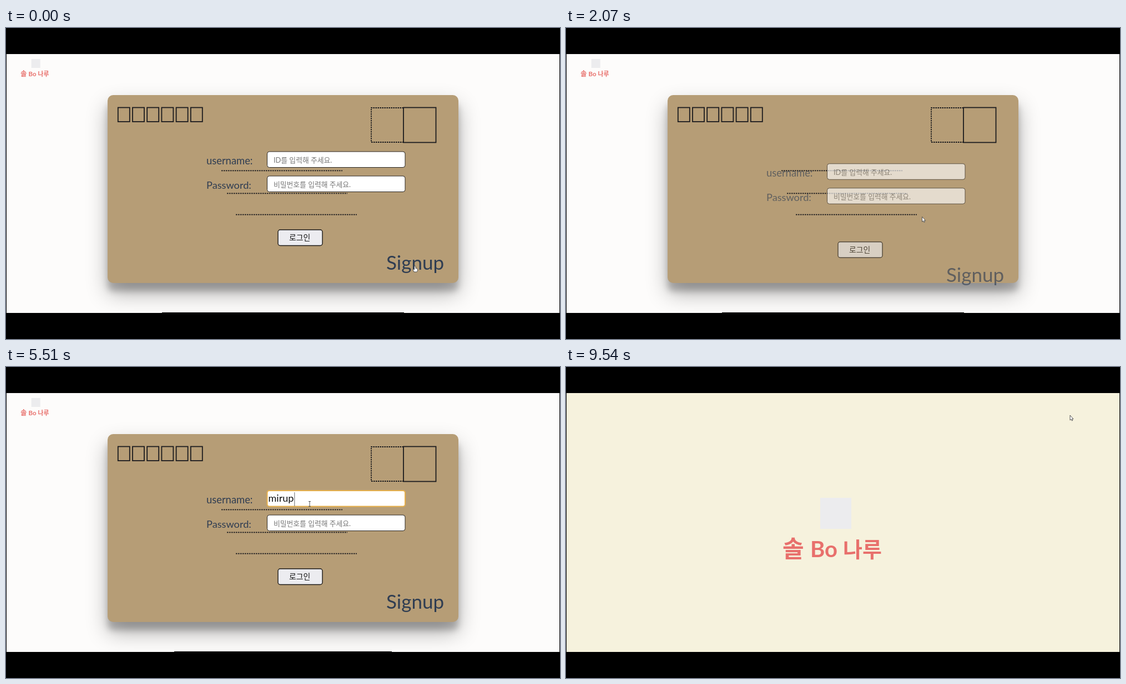
Animation, 998 px wide and 561 px high, one loop 9.57 s. Source, as an HTML page:

```html
<!DOCTYPE html>
<html lang="ko">
<head>
<meta charset="utf-8">
<title>Envelope login</title>
<style>
html, body { margin: 0; width: 100%; height: 100%; overflow: hidden; background: #000; }
#page { position: absolute; left: 1px; top: 47px; width: 996px; height: 467px; background: #fdfcfb; overflow: hidden; }
#envelope { position: absolute; left: 182px; top: 74px; width: 632px; height: 339px; border-radius: 10px; background: #b69d76;
  box-shadow: 0 19px 38px rgba(0,0,0,.3), 0 15px 12px rgba(0,0,0,.22); }
svg { position: absolute; left: 0; top: 0; }
text { font-family: Lato, "Noto Sans CJK KR", sans-serif; white-space: pre; }
</style>
</head>
<body>
<div id="page"><div id="envelope"></div></div>
<svg id="stage" width="998" height="561" viewBox="0 0 998 561"></svg>
<script>
const LOOP = 9570, INK = '#2f3d52', HINT = '#777';
const USER = 'mirupa47', PASS_LENGTH = 8;

const text = (x, y, size, s, fill = INK, extra = '') =>
  `<text x="${x}" y="${y}" font-size="${size}" fill="${fill}" ${extra}>${s}</text>`;
const box = (x, y, w, h, fill = '#fff', extra = 'stroke="#2a2622"') =>
  `<rect x="${x}" y="${y}" width="${w}" height="${h}" rx="4" fill="${fill}" ${extra}/>`;
const field = (x, y, w, hint, id = '') =>
  box(x, y, w, 28.5, '#fff', `stroke="#2a2622" id="${id}Box"`) +
  text(x + 11.5, y + 20, 12.8, hint, HINT, `id="${id}Hint"`);
const button = (x, y, w, h, tx, size, s) =>
  box(x, y, w, h, '#ececf0', 'stroke="#1c1a18" stroke-width="1.4"') +
  text(tx, y + h / 2 + 5, size, s, '#111', 'font-weight="500"');
const dotted = (x1, x2, y) => `<path d="M${x1} ${y}H${x2}"/>`;

const postcode = [0, 1, 2, 3, 4, 5].map(i =>
  `<rect x="${201.8 + i * 26.2}" y="143.5" width="21" height="25.5"/>`).join('');

stage.innerHTML = `
<g fill="none" stroke="#1b1b1e" stroke-width="1.8">
  ${postcode}
  <rect x="716" y="143.5" width="58.5" height="63"/>
  <g stroke-dasharray="2.6 1.4">
    <path d="M716 144H658V206H716"/>
    ${dotted(388, 606, 257.3)}${dotted(398, 615, 298.3)}${dotted(414, 632, 336.6)}
  </g>
</g>
<g id="login">
  ${text(361, 246, 18.4, 'username:')}
  ${text(361, 290, 18.2, 'Password:')}
  ${field(470.5, 223, 248.5, 'ID를 입력해 주세요.', 'user')}
  ${field(470.5, 267, 248.5, '비밀번호를 입력해 주세요.', 'pass')}
  ${text(472.5, 243, 18, '', '#111', 'id="typed"')}
  <rect id="compose" x="473.5" y="227.5" width="13.5" height="23" fill="none" stroke="#777" stroke-width=".8"/>
  <g id="dots"></g>
  <path id="caret" stroke="#666"/>
  ${button(490, 364, 80, 28.5, 510, 13.8, '로그인')}
  ${text(685, 436, 35, 'Signup')}
</g>
<g id="signup">
  ${text(197, 247, 15, '아이디:')}
  ${text(509, 247, 14, '이름:')}
  ${text(197, 289, 14.5, '비밀번호:')}
  ${text(509, 289, 14.5, '전화번호:')}
  ${field(270.5, 225, 135, 'ID (최대10자)')}
  ${button(411.5, 225, 73, 28.5, 426, 12, '중복확인')}
  ${field(577.5, 225, 218, '닉네임을 입력해주세요(최대 8글자)')}
  ${field(270.5, 267, 218, '영문자, 숫자, 특수문자 포함')}
  ${field(577.5, 267, 218, '-없이 숫자만 입력해주세요')}
  ${field(270.5, 309, 218, '비밀번호를 확인해주세요')}
  ${field(577.5, 309, 218, '이메일을 입력해주세요')}
  ${button(446, 366, 96, 29.5, 468, 14, '회원가입')}
  ${text(690, 436, 36, 'Login')}
</g>
<rect id="edge" y="513" height="2"/>
<g id="splash">
  <rect x="1" y="47" width="996" height="467" fill="#f6f2dd"/>
  <g id="residue">
    <path d="M1 426H997V514H1z" fill="#f8f0f0"/>
    <path d="M1 426H36V473H85L115 514H1zM895 473H997V514H865z" fill="#fdfdfb"/>
    <path d="M372 426H505V415H575V450H565V514H430L380 450H372z" fill="#fbf0da"/>
    <path d="M445 498H551V507H445z" fill="#cfc9c8"/>
  </g>
</g>
<g id="logo">
  <rect x="-22" y="-49" width="56" height="56" fill="#ececee"/>
  <text y="58" fill="#e8706c" font-weight="700"><tspan x="-90" font-size="42">솔</tspan><tspan x="-40" font-size="40">Bo</tspan><tspan x="19" font-size="38">나루</tspan></text>
</g>
<g id="cursor" stroke="#444" stroke-width=".9" stroke-linejoin="round">
  <path id="arrow" fill="#fff" d="M0 0V9L2 7.2 3.4 10 4.8 9.3 3.6 6.7H6z"/>
  <path id="hand" fill="#fff" d="M-2 5L-4 1Q-3 -1 -1.5 1V-5Q0 -6.5 1 -5V-1.5Q4 -2 4.5 0V3L3 5z"/>
  <path id="beam" fill="none" d="M-2 -4.5H2M0 -4.5V4.5M-2 4.5H2"/>
</g>`;

const $ = id => document.getElementById(id);
const clamp = v => Math.min(1, Math.max(0, v));
const part = (t, from, to) => clamp((t - from) / (to - from));
const smooth = p => p * p * (3 - 2 * p);
const mix = (a, b, p) => a + (b - a) * p;
const show = (id, on) => $(id).style.display = on ? '' : 'none';
const count = (t, from, step, max) => Math.min(max, Math.max(0, Math.floor((t - from) / step) + 1));

function form(id, enter, opacity) {
  $(id).setAttribute('opacity', opacity * enter);
  $(id).setAttribute('transform', `translate(0 ${60 * (1 - enter)})`);
  show(id, opacity * enter > 0);
}

function focus(id, on) {
  $(id + 'Box').setAttribute('stroke', on ? '#e6b04c' : '#2a2622');
  $(id + 'Box').setAttribute('stroke-width', on ? 2 : 1);
}

function drawFields(t) {
  const userFocus = t >= 3300 && t < 6500, passFocus = t >= 6500;
  const draft = t < 3560 ? '' : t < 3680 ? 'ㅂ' : t < 3800 ? '버' : t < 4200 ? '번' : '';
  const name = USER.slice(0, count(t, 4700, 190, USER.length));
  const dots = count(t, 6900, 220, PASS_LENGTH);
  focus('user', userFocus);
  focus('pass', passFocus);
  show('userHint', !draft && !name);
  show('passHint', !dots);
  $('typed').textContent = draft || name;
  $('typed').setAttribute('font-size', draft ? 15 : 18);
  show('compose', draft);
  $('dots').innerHTML = Array.from({ length: dots }, (_, i) =>
    `<circle cx="${484 + i * 23}" cy="282" r="3" fill="#111"/>`).join('');
  const x = passFocus ? 472.5 + dots * 23 : 474 + $('typed').getComputedTextLength();
  const y = passFocus ? 268.5 : 226;
  $('caret').setAttribute('d', `M${x} ${y}v25`);
  show('caret', (userFocus && !draft) || passFocus);
}

function drawCursor(t) {
  const toField = smooth(part(t, 1740, 2400)), away = smooth(part(t, 8960, 9500));
  const leaving = t >= 8880;
  const x = leaving ? mix(542, 908, away) : mix(737, 547, toField);
  const y = leaving ? mix(242, 87, away) : mix(435, 247, toField);
  $('cursor').setAttribute('transform', `translate(${x} ${y})`);
  const beam = !leaving && toField > .96, hand = toField < .04;
  show('beam', beam);
  show('hand', hand);
  show('arrow', !beam && !hand);
}

function draw(t) {
  form('login', t < 900 ? 1 : part(t, 1880, 2180), t < 900 ? 1 - part(t, 750, 900) : 1);
  form('signup', part(t, 900, 1190), 1 - part(t, 1700, 1880));
  drawFields(t);

  const inset = t < 2900 ? 281 : 303;
  $('edge').setAttribute('x', inset);
  $('edge').setAttribute('width', 998 - 2 * inset);
  show('edge', t < 5800);

  show('splash', t >= 8880);
  $('residue').setAttribute('opacity', 1 - part(t, 8960, 9060));
  const grow = 1 - (1 - part(t, 8880, 9540)) ** 1.6;
  $('logo').setAttribute('transform',
    `translate(${mix(52, 480, grow)} ${mix(70, 285, grow)}) scale(${mix(.287, 1, grow)})`);
  drawCursor(t);
}

const start = performance.now();
function tick() {
  draw((performance.now() - start) % LOOP);
  requestAnimationFrame(tick);
}
tick();
</script>
</body>
</html>
```
